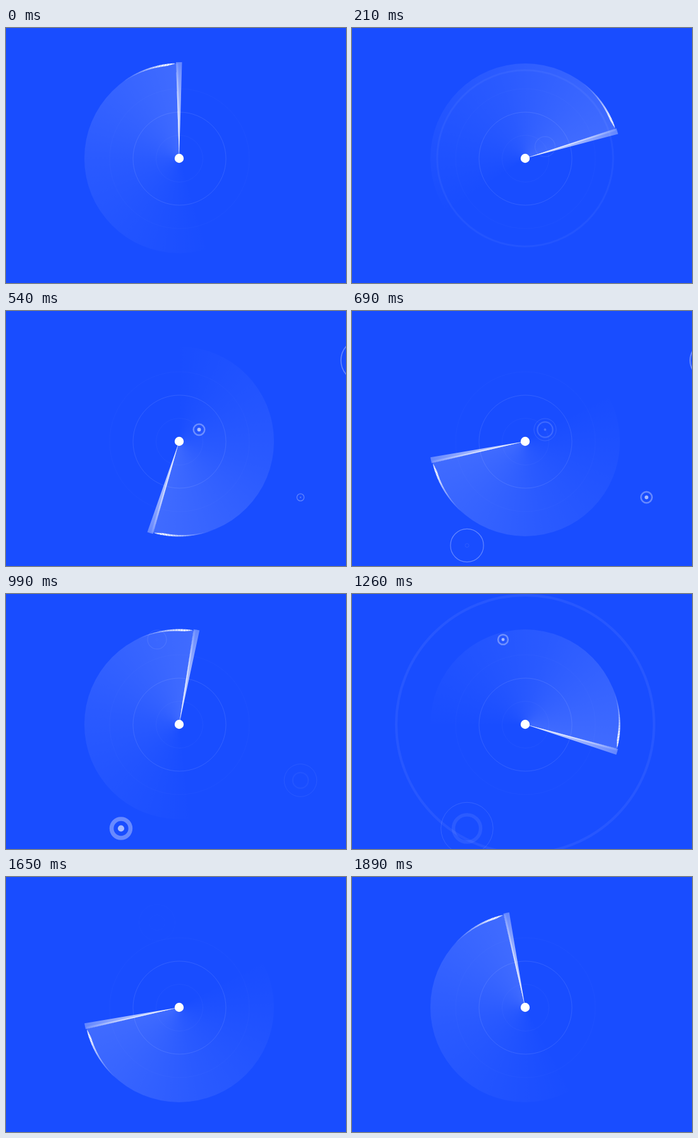
An HTML page with a canvas that plays this animation: 538x403 px, repeating every 1920 ms.

```html
<!DOCTYPE html>
<html lang="en">
<head>
<meta charset="utf-8">
<title>Radar sweep</title>
<style>
html, body { margin: 0; width: 100%; height: 100%; overflow: hidden; background: #194dff; }
canvas { display: block; }
</style>
</head>
<body>
<canvas id="c" width="538" height="403"></canvas>
<script>
const g = document.getElementById('c').getContext('2d');
const LOOP = 1920, TURN = 960, STEP = 30;
const CX = 274, CY = 206, R = 150, RAD = Math.PI / 180;

const clamp = (v, a = 0, b = 1) => Math.min(b, Math.max(a, v));
const lerp = (a, b, k) => a + (b - a) * k;
const ramp = (t, t0, t1, a, b) => lerp(a, b, clamp((t - t0) / (t1 - t0)));
const white = a => `rgba(255,255,255,${clamp(a)})`;

// Echoes: position, start time, size, stroke factor, strength of the closing ring
const pings = [
  { x: 305.5, y: 187.5, at: 157, size: 1, weight: 1, lead: 0.1 },
  { x: 466, y: 294.5, at: 310, size: 1, weight: 1, lead: 0.1 },
  { x: 239, y: 72, at: 920, size: 1, weight: 1, lead: 0.09 },
  { x: 182, y: 370.5, at: 620, size: 1.75, weight: 1.5, lead: 0.32 }
];

function ring(x, y, r, w, a) {
  if (a <= 0 || r <= 0) return;
  g.beginPath();
  g.arc(x, y, r, 0, 7);
  g.lineWidth = w;
  g.strokeStyle = white(a);
  g.stroke();
}

function disc(x, y, r, fill) {
  g.beginPath();
  g.arc(x, y, r, 0, 7);
  g.fillStyle = fill;
  g.fill();
}

function wedge(a0, a1, r, near, far) {
  const grad = g.createRadialGradient(CX, CY, 0, CX, CY, r);
  grad.addColorStop(0, white(near));
  grad.addColorStop(0.35, white(lerp(near, far, 0.3)));
  grad.addColorStop(1, white(far));
  g.beginPath();
  g.moveTo(CX, CY);
  g.arc(CX, CY, r, a0, a1);
  g.closePath();
  g.fillStyle = grad;
  g.fill();
}

// The sweep lags a little through the first two thirds of each turn
function heading(t) {
  const p = (t % TURN) / STEP;
  return p * 11.25 - 5.8 * clamp(Math.min(p / 8, (23 - p) / 6));
}

function sweep(deg) {
  const head = (deg - 91.9) * RAD;
  const tail = g.createConicGradient(head, CX, CY);
  tail.addColorStop(0, white(0));
  tail.addColorStop(0.45, white(0));
  tail.addColorStop(0.75, white(0.075));
  tail.addColorStop(1, white(0.17));
  disc(CX, CY, R, tail);

  for (let d = 2.5; d < 42; d += 0.5) {
    const w = d < 9 ? ramp(d, 2.5, 7, 1.2, 3.2) : ramp(d, 9, 40, 3.2, 0.6);
    const a = d < 10 ? ramp(d, 2, 4, 0.4, 0.95) : 0.95 * Math.pow(ramp(d, 10, 42, 1, 0), 1.6);
    const end = (deg - 90 - d) * RAD;
    g.beginPath();
    g.arc(CX, CY, R + 0.5 - w / 2, end - 0.5 * RAD, end);
    g.lineWidth = w;
    g.strokeStyle = white(a);
    g.stroke();
  }

  wedge(head, (deg - 88.3) * RAD, 152, 0.9, 0.32);
  wedge(head, (deg - 90.6) * RAD, 150, 1, 0.1);
}

function ping(p, t) {
  t -= p.at;
  if (t < 0 || t > 780) return;
  const { x, y, size: s } = p;
  if (t < 233) {
    const a = t < 70 ? ramp(t, 0, 70, 0, p.lead) : ramp(t, 80, 233, p.lead, 0.32);
    ring(x, y, s * lerp(19, 5.5, t / 233), 1.2, a);
    ring(x, y, s * 1.7, 1, p.lead * ramp(t, 30, 70, 0, 0.25));
    disc(x, y, s, white(ramp(t, 180, 233, 0, 0.35)));
    return;
  }
  const w = (t < 340 ? ramp(t, 233, 340, 1.2, 2.5) : ramp(t, 400, 540, 2.5, 2.1)) * s * p.weight;
  const a = t < 340 ? 0.34 : t < 520 ? ramp(t, 380, 520, 0.34, 0.17) : ramp(t, 520, 740, 0.17, 0);
  ring(x, y, s * ramp(t, 233, 540, 5.5, 12.3), w, a);
  ring(x, y, s * (9 + (t - 380) * 0.056), 1, ramp(t, 400, 520, 0, 0.12) * ramp(t, 640, 740, 1, 0));
  const dot = t < 380 ? ramp(t, 233, 370, 1, 2.9) : ramp(t, 390, 525, 2.9, 1.9);
  const glow = t < 400 ? ramp(t, 233, 350, 0.35, 0.62) : ramp(t, 400, 600, 0.62, 0);
  disc(x, y, s * dot, white(glow));
}

function draw(t) {
  g.fillStyle = '#194dff';
  g.fillRect(0, 0, 538, 403);

  ring(274.5, 206.5, 37, 1, 0.035);
  ring(274.5, 206.5, 73.5, 1, 0.11);
  ring(274.5, 206.5, 110.5, 1, 0.025);

  const phase = t % TURN;
  const second = t >= TURN;
  const r = 0.72 * phase - 12;
  if (r > 20) ring(CX, CY, r, second ? ramp(phase, 300, 480, 4, 8) : 3, second ? 0.06 : 0.045);

  // Large echo cut off by the right edge
  const edge = ramp(t, 340, 390, 0, 0.35) * ramp(t, 700, 840, 1, 0);
  ring(564, 78, 39 - (t - 390) / 30, ramp(t, 390, 690, 1, 2), edge);

  sweep(heading(t));
  for (const p of pings) ping(p, t);
  disc(CX, CY, 7.2, '#fff');
}

const start = performance.now();
function tick() {
  const t = (performance.now() - start) % LOOP;
  draw(Math.floor(t / STEP) * STEP);
  requestAnimationFrame(tick);
}
tick();
</script>
</body>
</html>
```
